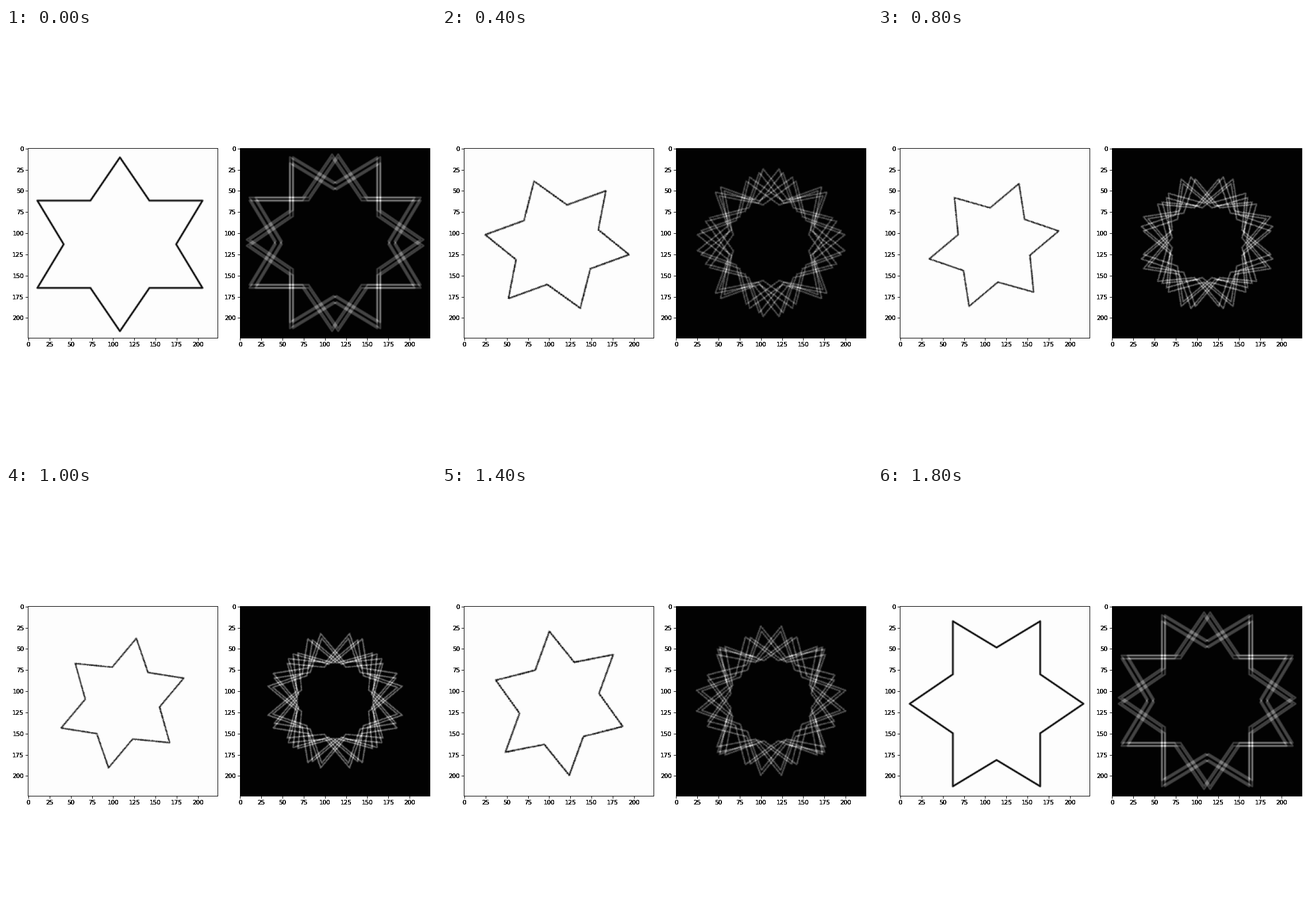
A matplotlib script that plays this animation: 748 by 748 pixels, repeating every 2 s.

```python
import numpy as np
import matplotlib.pyplot as plt
from matplotlib.animation import FuncAnimation

SIZE = 224
STEPS = 10
BLACK, WHITE = 2 / 255, 253 / 255
LINE_WIDTH = 2.0


def star_points(cx=107.9, cy=113.35):
    """Closed outline of a slightly widened six-pointed star."""
    quarter = np.array([(0, -102.3), (34.7, -51.4), (97.2, -51.4), (66.2, 0)])
    lower = quarter[2::-1] * (1, -1)
    left = np.concatenate([quarter[1:], lower[:2]])[::-1] * (-1, 1)
    ring = np.concatenate([quarter, lower, left])
    return np.vstack([ring, ring[:1]]) + (cx, cy)


def draw_outline(points):
    """Antialiased ink of a polyline on a square grid."""
    y, x = np.mgrid[:SIZE, :SIZE].astype(float)
    dist = np.full((SIZE, SIZE), np.inf)
    for (x0, y0), (x1, y1) in zip(points[:-1], points[1:]):
        dx, dy = x1 - x0, y1 - y0
        t = ((x - x0) * dx + (y - y0) * dy) / (dx * dx + dy * dy)
        t = t.clip(0, 1)
        dist = np.minimum(dist, np.hypot(x - x0 - t * dx, y - y0 - t * dy))
    return (LINE_WIDTH / 2 + 0.5 - dist).clip(0, 1)


def rotate(ink, degrees):
    """Nearest-pixel rotation onto a canvas grown to hold the corners."""
    c, s = np.cos(np.radians(degrees)), np.sin(np.radians(degrees))
    half = int(np.ceil(round(SIZE / 2 * (c + s), 6)))
    u = np.arange(2 * half) + 0.5 - half
    x, y = np.meshgrid(u, u)
    col = np.floor(c * x - s * y + SIZE / 2).astype(int)
    row = np.floor(s * x + c * y + SIZE / 2).astype(int)
    inside = (col >= 0) & (col < SIZE) & (row >= 0) & (row < SIZE)
    return np.where(inside, ink[row.clip(0, SIZE - 1), col.clip(0, SIZE - 1)], 0)


def shrink(ink):
    """Bilinear resize back to the base grid."""
    n = len(ink)
    target = (np.arange(SIZE) + 0.5)[:, None] * n / SIZE
    weights = (1 - abs(np.arange(n) + 0.5 - target)).clip(0)
    return weights @ ink @ weights.T


def symmetrize(ink):
    """Sum over all rotations and reflections of the square."""
    turns = [np.rot90(ink, k) for k in range(4)]
    return sum(turn + turn.T for turn in turns)


def tone(level):
    """Map 0..1 onto the displayed range of grays."""
    return BLACK + (WHITE - BLACK) * level


star = draw_outline(star_points())

fig, axes = plt.subplots(1, 2, figsize=(10, 10), dpi=74.8)
blank = np.zeros((SIZE, SIZE))
left, right = [ax.imshow(blank, cmap="gray", vmin=0, vmax=1) for ax in axes]
fig.tight_layout()

# Overlaid copies of the axes give the labels their heavy, hard edge.
for ax in axes:
    for _ in range(3):
        fig.add_axes(ax.get_position(), facecolor="none",
                     xlim=ax.get_xlim(), ylim=ax.get_ylim())


def update(step):
    ink = shrink(rotate(star, 90 * step / (STEPS - 1)))
    total = symmetrize(ink)
    left.set_data(tone(1 - ink))
    right.set_data(tone(total / total.max()))
    return left, right


anim = FuncAnimation(fig, update, frames=STEPS, interval=200, repeat=True)
plt.show()
```
